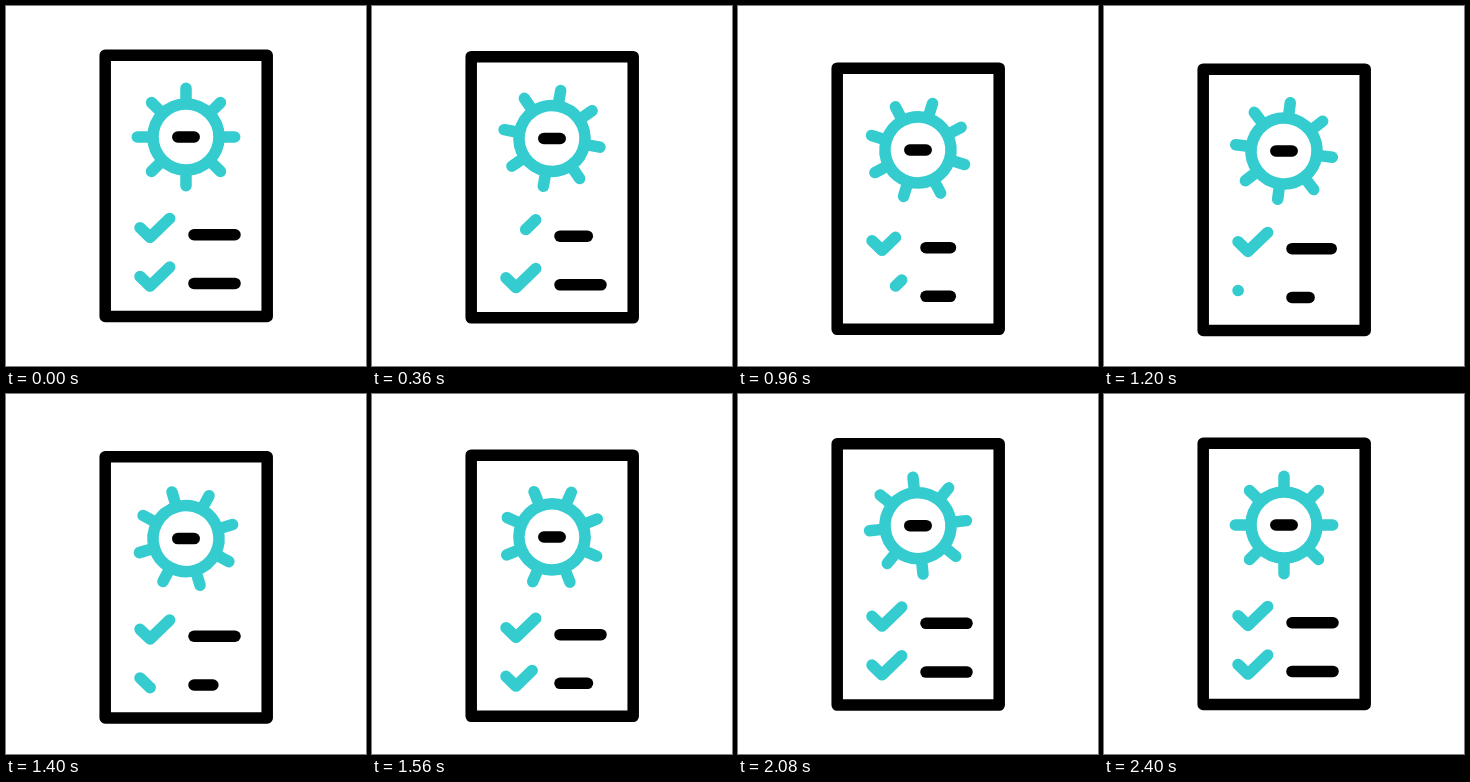
Write an HTML page that moves like this. It is 360x360 px and loops after 2440 ms.

```html
<!DOCTYPE html>
<html lang="en">
<head>
<meta charset="utf-8">
<title>Checklist</title>
<style>
  html, body { margin: 0; height: 100%; overflow: hidden; background: #fff; }
  svg { display: block; width: 100vw; height: 100vh; }
  path, rect, circle {
    fill: none; stroke: #000; stroke-width: 11.5;
    stroke-linecap: round; stroke-linejoin: round;
  }
  #gear *, .check { stroke: #34cccf; }
</style>
</head>
<body>
<svg viewBox="0 0 360 360">
  <g id="card">
    <rect x="99.2" y="49.2" width="162" height="261.2"/>
    <g id="gear"><circle cx="180" cy="131" r="33"/></g>
    <path d="M171.8 131H188.2"/>
    <g class="row">
      <path class="check" pathLength="1" d="M134 221.7L144 231.4L163.7 212.4"/>
      <path class="line"/>
    </g>
    <g class="row" transform="translate(0 48.7)">
      <path class="check" pathLength="1" d="M134 221.7L144 231.4L163.7 212.4"/>
      <path class="line"/>
    </g>
  </g>
</svg>
<script>
const LOOP = 2440;
const ROW_DELAY = 560;
const card = document.getElementById('card');
const gear = document.getElementById('gear');
const rows = [...document.querySelectorAll('.row')].map(row => ({
  check: row.querySelector('.check'),
  line: row.querySelector('.line')
}));

for (let angle = 0; angle < 360; angle += 45) {
  const spoke = document.createElementNS('http://www.w3.org/2000/svg', 'path');
  spoke.setAttribute('d', 'M180 95V82.3');
  spoke.setAttribute('transform', `rotate(${angle} 180 131)`);
  gear.append(spoke);
}

// Symmetric cubic-bezier(.57, 0, .43, 1) progress between two times
function ease(t, from, to) {
  const x = (t - from) / (to - from);
  if (x <= 0) return 0;
  if (x >= 1) return 1;
  const bezier = (s, a, b) => 3 * (1 - s) ** 2 * s * a + 3 * (1 - s) * s * s * b + s ** 3;
  let low = 0, high = 1;
  for (let i = 0; i < 20; i++) {
    const mid = (low + high) / 2;
    if (bezier(mid, 0.57, 0.43) < x) low = mid; else high = mid;
  }
  return bezier(low, 0, 1);
}

function drawRow({ check, line }, t) {
  const erasing = t < 600;
  const start = erasing ? ease(t, 40, 600) : 0;
  const end = erasing ? 1 : ease(t, 600, 1160);
  check.setAttribute('stroke-dasharray', `${Math.max(end - start, 0.001)} 3`);
  check.setAttribute('stroke-dashoffset', -start);

  const shrink = ease(t, 0, 680) - ease(t, 680, 1360);
  line.setAttribute('d', `M188 228.7H${229 - 24 * shrink}`);
}

function draw(now) {
  const t = now % LOOP;
  const drop = 14 * (ease(t, 40, 1240) - ease(t, 1240, 2280));
  card.setAttribute('transform', `translate(0 ${drop})`);
  gear.setAttribute('transform', `rotate(${360 * ease(t, 0, 2360)} 180 131)`);
  rows.forEach((row, i) => drawRow(row, t - i * ROW_DELAY));
}

function tick() {
  draw(performance.now());
  requestAnimationFrame(tick);
}
tick();
</script>
</body>
</html>
```
